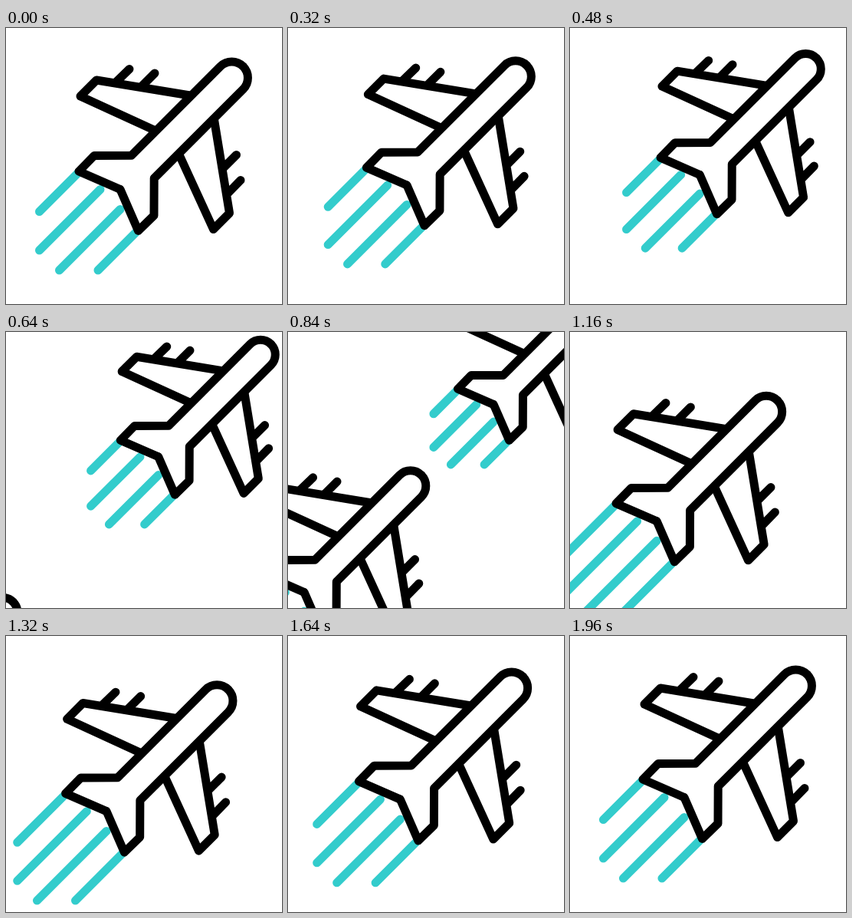
Write an HTML page with a canvas that moves like this. It is 360 px wide and 360 px high and loops after 2000 ms.

```html
<!DOCTYPE html>
<html>
<head>
<meta charset="utf-8">
<style>
html, body { margin: 0; height: 100%; overflow: hidden; background: #fff; }
canvas { display: block; }
</style>
</head>
<body>
<canvas id="stage" width="360" height="360"></canvas>
<script>
const ctx = document.getElementById('stage').getContext('2d');
const STEP = 40, STEPS = 50, PIVOT = 192, AXIS = 359.5;

// One half of the plane; the other is its mirror image across x + y = AXIS
const hull = new Path2D('M149 210.5 95 187 115 166.5 163.5 166.3 279.6 50.2A21 21 0 0 1 309.3 50.2');
const wing = new Path2D('M240 88 118 68 97 89 193 133M143 71 161 53.5M177 76 194 59');

function trail(startX, sum, stretch) {
  const endX = 43.5 - stretch;
  ctx.moveTo(startX, sum - startX);
  ctx.lineTo(endX, sum - endX);
}

function drawHalf(stretch) {
  ctx.strokeStyle = '#33cccc';
  ctx.beginPath();
  trail(95, 283, stretch);
  trail(123, 333.5, stretch);
  ctx.stroke();
  ctx.strokeStyle = '#000';
  ctx.fill(hull);
  ctx.stroke(hull);
  ctx.stroke(wing);
}

// shift runs along the flight diagonal; stretch lengthens the trails
function drawPlane(shift, scale, stretch) {
  ctx.save();
  ctx.translate(PIVOT + shift, PIVOT - shift);
  ctx.scale(scale, scale);
  ctx.translate(-PIVOT, -PIVOT);
  ctx.lineWidth = 11 / scale; // lines keep their weight at every size
  ctx.lineCap = ctx.lineJoin = 'round';
  ctx.fillStyle = '#fff';
  drawHalf(stretch);
  ctx.transform(0, -1, -1, 0, AXIS, AXIS);
  drawHalf(stretch);
  ctx.restore();
}

// Accelerates and shrinks towards the upper right
function drawDeparting(n) {
  const shift = n < 4 ? 0 : 0.00815 * n ** 3 + 0.000195 * n ** 4;
  const scale = n < 4 ? 1 : 1 - 0.025 * (n / 8) ** 1.75;
  drawPlane(shift, scale, -1.15 * Math.max(0, n - 8));
}

// Slows down into the resting pose
function drawArriving(left) {
  drawPlane(-0.00361 * left ** 3 - 8.36e-11 * left ** 8,
    1 - 0.03 * (left / 25) ** 3,
    12 * (left / 17) ** 2);
}

function draw(now) {
  const n = Math.floor(now / STEP) % STEPS;
  ctx.clearRect(0, 0, 360, 360);
  if (n < 32) drawDeparting(n);
  if (n > 10) drawArriving(STEPS - n);
}

const start = performance.now();
function tick() {
  draw(performance.now() - start);
  requestAnimationFrame(tick);
}
tick();
</script>
</body>
</html>
```
